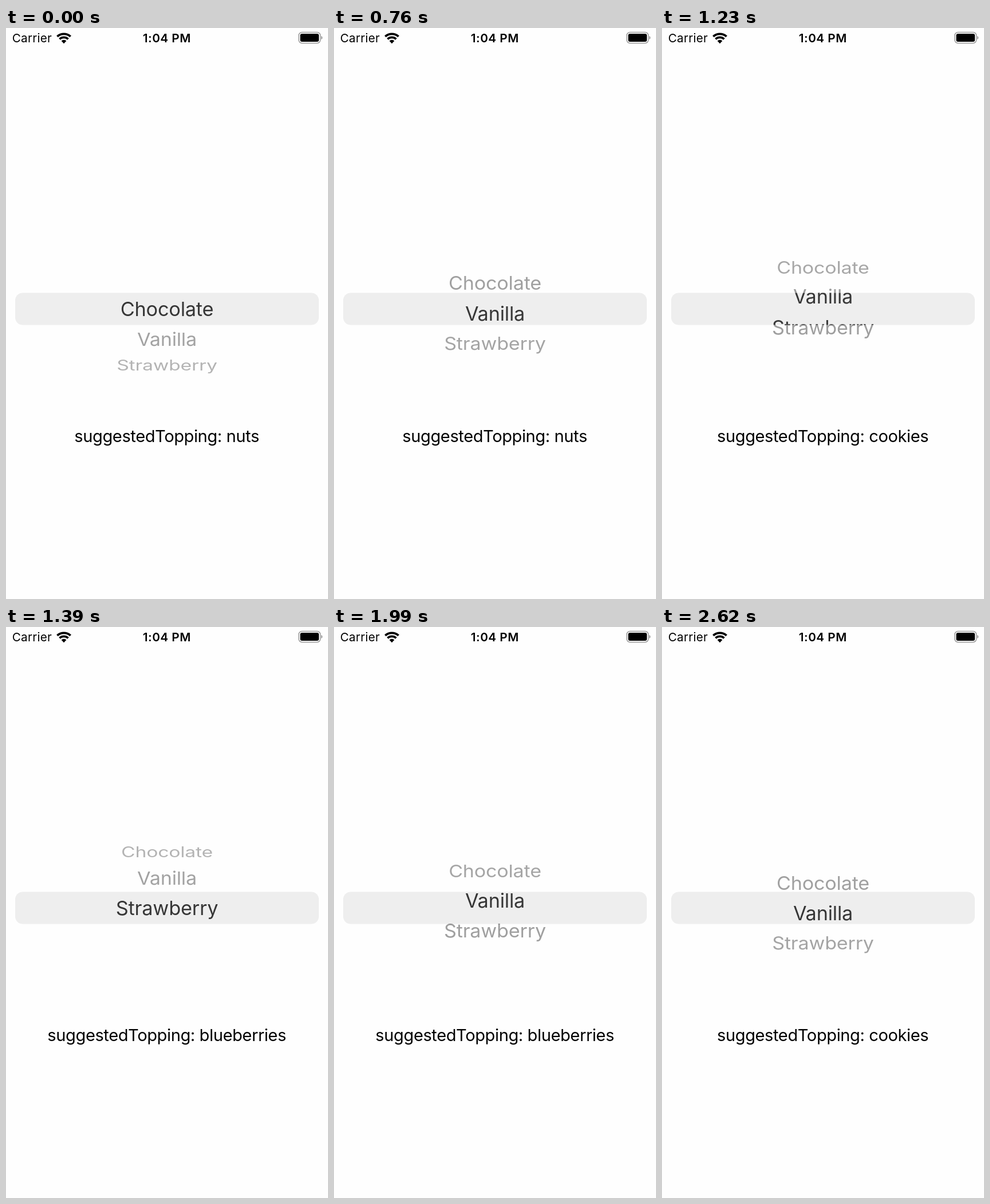
Write an HTML page that moves like this. It is 562 px wide and 997 px high and loops after 3.14 s.

```html
<!DOCTYPE html>
<html lang="en">
<head>
<meta charset="utf-8">
<title>Flavour picker</title>
<style>
  html, body { margin: 0; width: 100%; height: 100%; overflow: hidden; background: #fefefe; }
  svg { display: block; width: 100%; height: 100%; font-family: Inter, sans-serif; }
  .mid { text-anchor: middle; }
  .status { font-size: 20.7px; letter-spacing: .25px; }
  .clock { font-weight: 600; letter-spacing: .5px; }
  .wheel { font-size: 34.2px; letter-spacing: -.15px; }
  .label { font-size: 29px; letter-spacing: -.37px; }
</style>
</head>
<body>
<svg viewBox="0 0 562 997">
  <defs>
    <clipPath id="inside"><rect y="462.5" width="562" height="56"/></clipPath>
    <clipPath id="outside">
      <rect y="340" width="562" height="122.5"/>
      <rect y="518.5" width="562" height="122.5"/>
    </clipPath>
  </defs>

  <g class="status">
    <text x="10.7" y="25.2">Carrier</text>
    <text class="mid clock" x="280.8" y="25.2">1:04 PM</text>
  </g>
  <g fill="none" stroke="#000" stroke-width="3.8">
    <path d="M89.4 14.9A17 17 0 0 1 112.6 14.9M93.5 19.3A11 11 0 0 1 108.5 19.3"/>
    <path d="M101 27.3L96.6 22.6A6.4 6.4 0 0 1 105.4 22.6Z" fill="#000" stroke="none"/>
  </g>
  <rect x="511" y="7.5" width="37.6" height="19" rx="5.5" fill="none" stroke="#999" stroke-width="1.5"/>
  <rect x="513.5" y="10" width="32.6" height="14" rx="3.2"/>
  <path d="M550.2 13.7Q552.4 14.9 552.4 17T550.2 20.3Z" fill="#999"/>

  <rect x="16" y="462.5" width="530" height="56" rx="13" fill="#eee"/>
  <g class="mid wheel" clip-path="url(#outside)" id="dim"></g>
  <g class="mid wheel" clip-path="url(#inside)" id="lit" fill="#363636"></g>
  <text class="mid label" id="label" x="280.6" y="722.8"></text>
</svg>
<script>
  const LOOP = 3140;
  const RADIUS = 146.2, STEP = 21.05 * Math.PI / 180;
  const CENTER = { x: 281, y: 491 };
  const flavours = ['Chocolate', 'Vanilla', 'Strawberry'];
  const toppings = ['nuts', 'cookies', 'blueberries'];

  // [start in ms, wheel position in rows, topping index]
  const poses = [
    [0, 0, 0],
    [670, .402, 0], [760, .85, 0], [840, 1, 1],
    [1230, 1.4, 1], [1310, 1.85, 1], [1390, 2, 2],
    [1890, 1.767, 2], [1990, 1.25, 2], [2100, 1, 1],
    [2620, .823, 1]
  ];

  const $ = id => document.getElementById(id);

  function addRows(group) {
    return flavours.map(name => {
      const row = document.createElementNS(group.namespaceURI, 'text');
      row.setAttribute('y', 12);
      row.textContent = name;
      return group.appendChild(row);
    });
  }

  const dim = addRows($('dim')), lit = addRows($('lit'));
  let shown = null;

  function draw(pose) {
    const [, pos, topping] = pose;
    flavours.forEach((_, i) => {
      const angle = (i - pos) * STEP, cos = Math.cos(angle);
      const y = CENTER.y + RADIUS * Math.sin(angle);
      const size = 1 - .06 * (1 - cos);
      const place = `translate(${CENTER.x} ${y}) scale(${size} ${size * cos})`;
      dim[i].setAttribute('transform', place);
      lit[i].setAttribute('transform', place);
      dim[i].setAttribute('fill-opacity', .04 + .345 * cos);
    });
    $('label').textContent = 'suggestedTopping: ' + toppings[topping];
  }

  const start = performance.now();

  function tick() {
    const t = (performance.now() - start) % LOOP;
    const pose = poses.findLast(p => p[0] <= t) || poses[0];
    if (pose !== shown) draw(shown = pose);
    requestAnimationFrame(tick);
  }
  tick();
</script>
</body>
</html>
```
